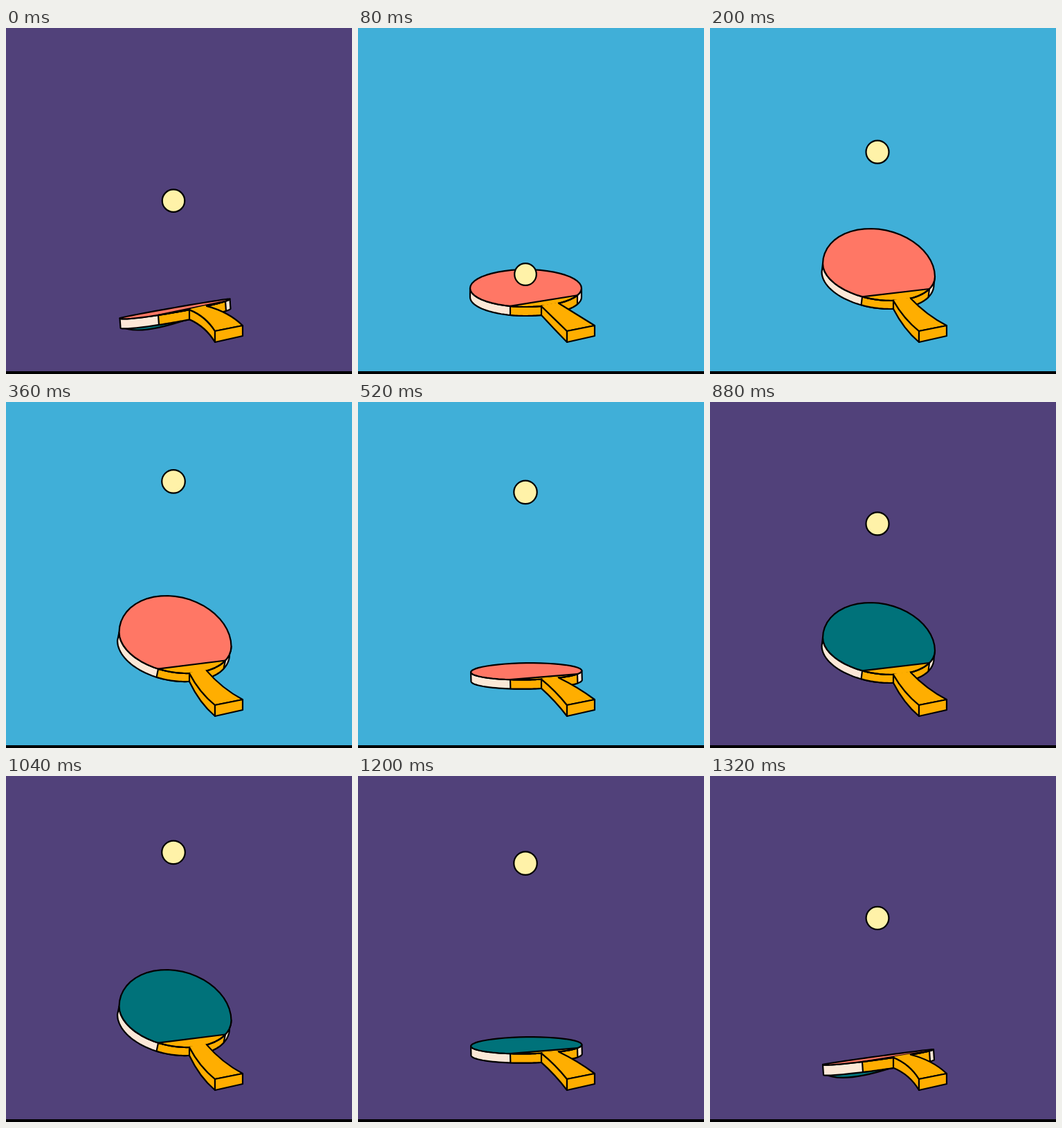
An HTML page with a canvas for the animation above (1.36 s loop, 500x500 px).

```html
<!DOCTYPE html>
<html lang="en">
<head>
<meta charset="utf-8">
<title>Paddle and ball</title>
<style>
  html, body { margin: 0; width: 100%; height: 100%; overflow: hidden; background: #51417a; }
  canvas { display: block; width: 500px; height: 500px; }
</style>
</head>
<body>
<canvas id="stage" width="500" height="500"></canvas>
<script>
const ctx = document.getElementById('stage').getContext('2d');
const LOOP = 1360, BOUNCE = 680, HIT = 80, STEP = 40, FLIP = 500;
const RED = '#ff7765', TEAL = '#00727a', WOOD = '#ffae00', CREAM = '#fce8d7';
const BLUE = '#40afd8', PURPLE = '#51417a', BALL = '#fff2a8';

// Blade poses after a hit: time, centre x, y, slope, half width, far and near
// half height, thickness, handle bend, underside sag, rim lean, far taper
const POSES = [
  [0, 242.5, 376, 0, 80.5, 27, 27, 13, 0, 0, 0, 0],
  [120, 244, 350, .115, 81, 59.3, 43, 12, -.7, 0, -1.5, 0],
  [280, 244.5, 343, .125, 81, 62.2, 48, 12, -.8, 0, -2.5, 0],
  [500, 243, 403, -.08, 80, 1, 4, 14, .8, 0, 1, 0],
  [560, 243, 406, -.137, 80, 1, 4, 15, 1, 13, 1, 0],
  [600, 244, 405.5, -.175, 79.5, 1.5, 5.5, 14, 1, 12, 1, 0],
  [640, 243.5, 393, -.112, 80.5, 6.8, 13, 14, .6, 0, 1, .84]
];
const N = POSES.length;

// Pose i of the endless cycle
function key(i) {
  const turn = Math.floor(i / N), pose = POSES[i - turn * N].slice();
  pose[0] += turn * BOUNCE;
  return pose;
}

// Monotone cubic through the poses
function poseAt(t) {
  let i = N - 1;
  while (POSES[i][0] > t) i--;
  const [a, b, c, d] = [key(i - 1), key(i), key(i + 1), key(i + 2)];
  const span = c[0] - b[0], u = (t - b[0]) / span;
  const rate = (p, q, j) => (q[j] - p[j]) / (q[0] - p[0]);
  const tangent = (m, n) => m * n > 0 ? 2 * m * n / (m + n) : 0;
  return b.map((v, j) => {
    if (!j) return t;
    const mid = rate(b, c, j);
    const m0 = tangent(rate(a, b, j), mid) * span;
    const m1 = tangent(mid, rate(c, d, j)) * span;
    const e = u * u * (3 - 2 * u);
    return v + (c[j] - v) * e + m0 * u * (1 - u) ** 2 - m1 * u * u * (1 - u);
  });
}

// Same curve as a CSS cubic-bezier()
function bezier(x1, y1, x2, y2) {
  const at = (p, q, s) => 3 * (1 - s) ** 2 * s * p + 3 * (1 - s) * s * s * q + s ** 3;
  return x => {
    let lo = 0, hi = 1;
    for (let i = 0; i < 24; i++) {
      const mid = (lo + hi) / 2;
      if (at(x1, x2, mid) < x) lo = mid; else hi = mid;
    }
    return at(y1, y2, lo);
  };
}
const fall = bezier(.55, 0, .8, .65);

function paint(path, fill, line = true) {
  if (fill) { ctx.fillStyle = fill; ctx.fill(path); }
  if (line) ctx.stroke(path);
}

function drawPaddle(t, top, under) {
  const [, cx, cy, slope, rx, far, near, thick, bend, sag, lean, taper] = poseAt(t);
  const angle = x => Math.acos(Math.max(-1, Math.min(1, (x - cx) / rx)));
  const point = a => {
    const c = Math.cos(a), s = Math.sin(a), dx = rx * c;
    return [cx + dx, cy + slope * dx + (s > 0 ? near : far * (1 + taper * c)) * s];
  };
  const arc = (path, from, to, dx = 0, dy = 0) => {
    for (let i = 0; i <= 48; i++) {
      const [x, y] = point(from + (to - from) * i / 48);
      path.lineTo(x + dx, y + dy);
    }
  };
  const band = (from, to) => {
    const path = new Path2D();
    arc(path, from, to);
    arc(path, to, from, lean, thick);
    path.closePath();
    return path;
  };
  const a0 = angle(220), a1 = angle(317);
  const left = point(Math.PI);
  const [lx, ly] = point(angle(265));
  const [nx, ny] = point(angle(290));

  if (sag > .5) {
    const lens = new Path2D();
    lens.moveTo(left[0] + 2, left[1] + thick - 2);
    lens.quadraticCurveTo(190, left[1] + thick + sag, 262, ly + thick);
    paint(lens, under);
  }

  // Rim
  paint(band(Math.PI, 0), CREAM);
  paint(band(a0, a1), WOOD);

  // Face with its wooden segment
  const face = new Path2D();
  arc(face, 0, 2 * Math.PI);
  face.closePath();
  paint(face, top, false);
  const heel = new Path2D();
  arc(heel, a0, a1);
  heel.closePath();
  paint(heel, WOOD);
  paint(face);

  // Handle
  const ox = 5 * bend, oy = -6 * bend;
  const lc = [(lx + 302) / 2 + ox, (ly + 438) / 2 + oy];
  const rc = [(nx + 342) / 2 + ox, (ny + 430) / 2 + oy];
  const side = new Path2D();
  side.moveTo(lx, ly);
  side.quadraticCurveTo(lc[0], lc[1], 302, 438);
  side.lineTo(302, 454);
  side.quadraticCurveTo(lc[0], lc[1] + 15, lx, ly + thick);
  side.closePath();
  paint(side, WOOD);

  const grip = new Path2D();
  grip.moveTo(lx, ly);
  grip.quadraticCurveTo(lc[0], lc[1], 302, 438);
  grip.lineTo(342, 430);
  grip.quadraticCurveTo(rc[0], rc[1], nx, ny);
  const joint = new Path2D(grip);
  joint.lineTo(nx - 2, ny - 1);
  joint.lineTo(lx + 2, ly - 1.5);
  paint(joint, WOOD, false);
  paint(grip);
  paint(new Path2D('M302 438L342 430V445L302 454Z'), WOOD);
}

function drawBall(t, apex) {
  const half = BOUNCE / 2, u = Math.abs(t - half) / half;
  const y = apex + (356 - apex) * (t < half ? u ** 3 : fall(u));
  const ball = new Path2D();
  ball.arc(242, y, 15.8 + (356 - y) / 246, 0, 2 * Math.PI);
  paint(ball, BALL);
}

function draw(now) {
  const time = Math.floor(now % LOOP / STEP) * STEP;
  const since = (time - HIT + LOOP) % LOOP;
  const first = since < BOUNCE, t = since % BOUNCE;
  const [front, back] = first ? [RED, TEAL] : [TEAL, RED];
  const flipped = t >= FLIP;

  ctx.fillStyle = first ? BLUE : PURPLE;
  ctx.fillRect(0, 0, 500, 500);
  ctx.fillStyle = '#000';
  ctx.fillRect(0, 496, 500, 4);
  ctx.strokeStyle = '#000';
  ctx.lineWidth = 2.2;
  ctx.lineJoin = ctx.lineCap = 'round';
  drawPaddle(t, flipped ? back : front, flipped ? front : back);
  drawBall(t, first ? 113.5 : 109);
}

const start = performance.now();
function tick() {
  draw(performance.now() - start);
  requestAnimationFrame(tick);
}
tick();
</script>
</body>
</html>
```
